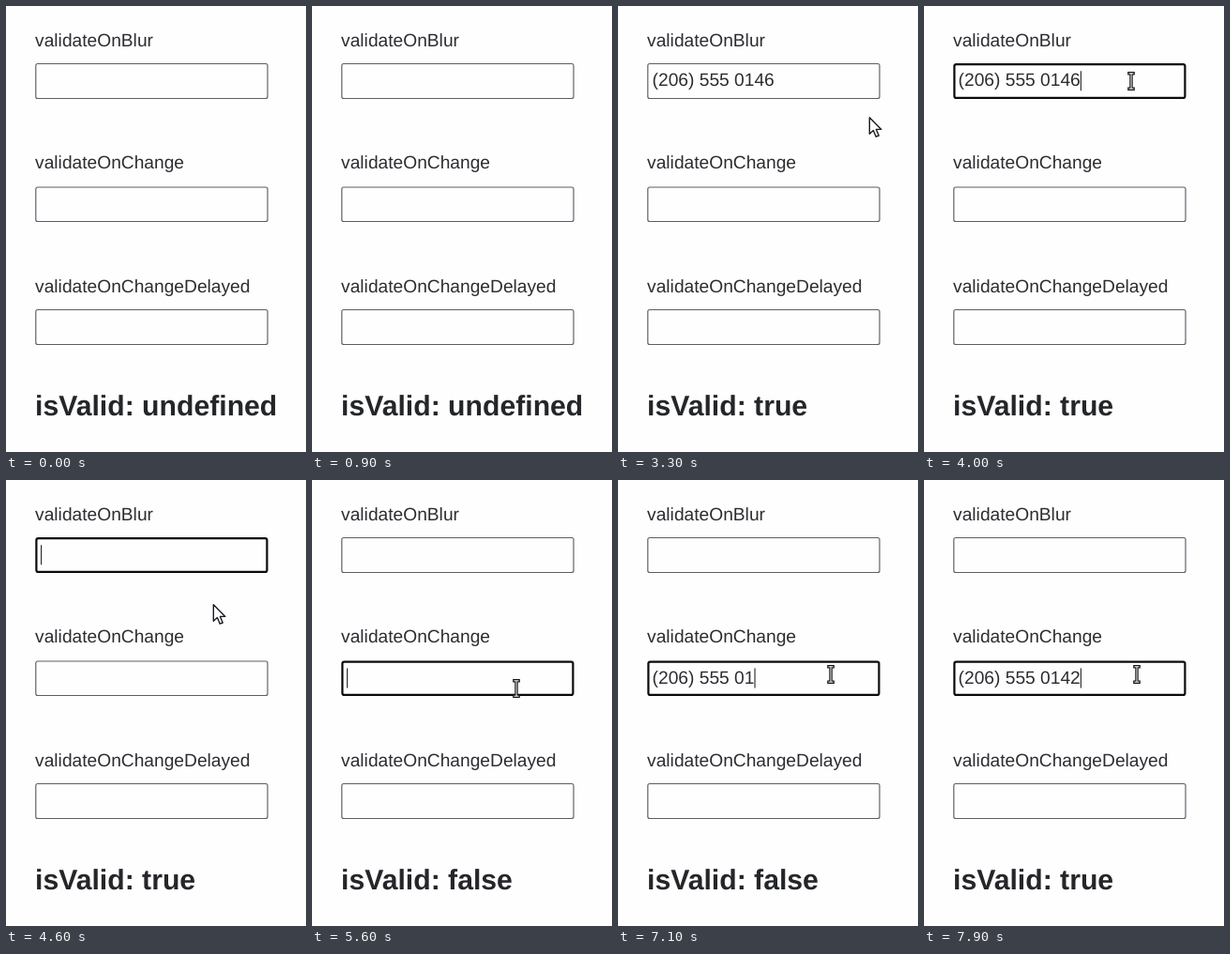
Write an HTML page that moves like this. It is 320x475 px and loops after 8000 ms.

```html
<!DOCTYPE html>
<html lang="en">
<head>
<meta charset="utf-8">
<title>Field validation</title>
<style>
  html, body { margin: 0; width: 100%; height: 100%; overflow: hidden; background: #fefefe; }
  svg { display: block; width: 100%; height: 100%; }
  text {
    font: 19.2px "Liberation Sans", Arial, sans-serif;
    fill: #2b2d31; white-space: pre; text-rendering: geometricPrecision;
  }
  #status { font-size: 30.2px; font-weight: bold; fill: #242629; }
  .box { fill: #fefefe; stroke: #5c5d66; stroke-width: 1.15; }
  .box.focus { stroke: #0b0b0e; stroke-width: 2.2; }
  #caret { stroke: #222; stroke-width: 1.1; }
  #arrow { fill: #fff; stroke: #1d1b22; stroke-width: 1.4; stroke-linejoin: round; }
  #beam { fill: none; stroke: #111; stroke-width: 3.4; }
  #beam .core { stroke: #fff; stroke-width: 1; }
</style>
</head>
<body>
<svg viewBox="0 0 320 475">
  <g id="fields"></g>
  <text id="status" x="31" y="435.7"></text>
  <path id="caret"/>
  <g id="cursor">
    <path id="arrow" d="M.3.7V18.3L4.4 14.6 7.2 21.2 10.2 20 7.4 13.4H12.8Z"/>
    <g id="beam">
      <path d="M-3.8-8.2H3.8M0-8.2V8.2M-3.8 8.2H3.8"/>
      <path class="core" d="M-2.6-8.2H2.6M0-8.2V8.2M-2.6 8.2H2.6"/>
    </g>
  </g>
</svg>
<script>
const LOOP = 8000, STEP = 100;
const LEFT = 31.8, RIGHT = 279;
const LAYOUT = [
  { label: "validateOnBlur", baseline: 42.8, top: 61.5, bottom: 98.5 },
  { label: "validateOnChange", baseline: 173.2, top: 193, bottom: 229.5 },
  { label: "validateOnChangeDelayed", baseline: 305, top: 323.5, bottom: 360.5 }
];
const PHONE = "(206) 555 0146";
const FIXED = PHONE.slice(0, -1) + "2";

// Each entry changes part of the form state from its time on.
const EVENTS = [
  [0, { focus: -1, values: ["", "", ""], valid: "undefined" }],
  [2000, { focus: 0 }],
  [2500, { values: [PHONE, "", ""] }],
  [3200, { focus: -1, valid: "true" }],
  [3700, { focus: 0 }],
  [4100, { values: ["", "", ""] }],
  [4900, { focus: -1, valid: "false" }],
  [5400, { focus: 1 }],
  [6000, { values: ["", PHONE, ""], valid: "true" }],
  [6900, { values: ["", PHONE.slice(0, -1), ""], valid: "false" }],
  [7100, { values: ["", PHONE.slice(0, -2), ""] }],
  [7400, { values: ["", FIXED.slice(0, -1), ""] }],
  [7600, { values: ["", FIXED, ""], valid: "true" }]
];

// Pointer strokes as [time, x, y]; the pointer is hidden between strokes.
const STROKES = [
  [[1000, 269, 112], [1200, 262, 104], [1400, 235, 90], [1700, 159, 79],
   [2100, 159, 79], [2200, 302, 92]],
  [[2900, 272, 122], [3100, 268, 118], [3300, 268, 118], [3700, 221, 80],
   [4200, 221, 80], [4600, 221, 132], [4900, 221, 132], [5300, 218, 222],
   [5600, 218, 222], [5900, 227, 207], [LOOP, 227, 207]]
];

const $ = id => document.getElementById(id);

function setAttrs(node, attrs) {
  for (const [name, value] of Object.entries(attrs)) node.setAttribute(name, value);
}

function add(tag, attrs, content = "") {
  const node = document.createElementNS("http://www.w3.org/2000/svg", tag);
  setAttrs(node, attrs);
  node.textContent = content;
  return $("fields").appendChild(node);
}

const fields = LAYOUT.map(({ label, baseline, top, bottom }) => {
  add("text", { x: 31.1, y: baseline }, label);
  const middle = (top + bottom) / 2;
  return {
    top, bottom, middle,
    box: add("rect", { rx: 2 }),
    value: add("text", { x: 36.6, y: middle + 5.4 })
  };
});

function pointerAt(t) {
  const path = STROKES.find(p => t >= p[0][0] && t <= p[p.length - 1][0]);
  if (!path) return null;
  const i = Math.max(1, path.findIndex(p => p[0] >= t));
  const [t0, x0, y0] = path[i - 1], [t1, x1, y1] = path[i];
  const k = (t - t0) / (t1 - t0);
  return { x: x0 + (x1 - x0) * k, y: y0 + (y1 - y0) * k };
}

function drawForm({ focus, values, valid }) {
  fields.forEach(({ top, bottom, box, value }, i) => {
    const active = i === focus, inset = active ? 0.6 : 0;
    setAttrs(box, {
      class: active ? "box focus" : "box",
      x: LEFT + inset, y: top + inset,
      width: RIGHT - LEFT - inset * 2, height: bottom - top - inset * 2
    });
    value.textContent = values[i];
  });
  $("status").textContent = "isValid: " + valid;

  $("caret").style.display = focus < 0 ? "none" : "";
  if (focus >= 0) {
    const { middle, value } = fields[focus];
    const x = 37.6 + (values[focus] ? value.getComputedTextLength() - 0.4 : 0);
    $("caret").setAttribute("d", `M${x} ${middle - 10.8}v21`);
  }
}

function drawPointer(point) {
  $("cursor").style.display = point ? "" : "none";
  if (!point) return;
  const { x, y } = point;
  const inField = x > LEFT && x < RIGHT && fields.some(f => y > f.top && y < f.bottom);
  $("cursor").setAttribute("transform", `translate(${x} ${y})`);
  $("beam").style.display = inField ? "" : "none";
  $("arrow").style.display = inField ? "none" : "";
}

const start = performance.now();

function render() {
  const t = Math.floor((performance.now() - start) % LOOP / STEP) * STEP;
  const past = EVENTS.filter(([time]) => time <= t).map(([, change]) => change);
  drawForm(Object.assign({}, ...past));
  drawPointer(pointerAt(t));
  requestAnimationFrame(render);
}
render();
</script>
</body>
</html>
```
